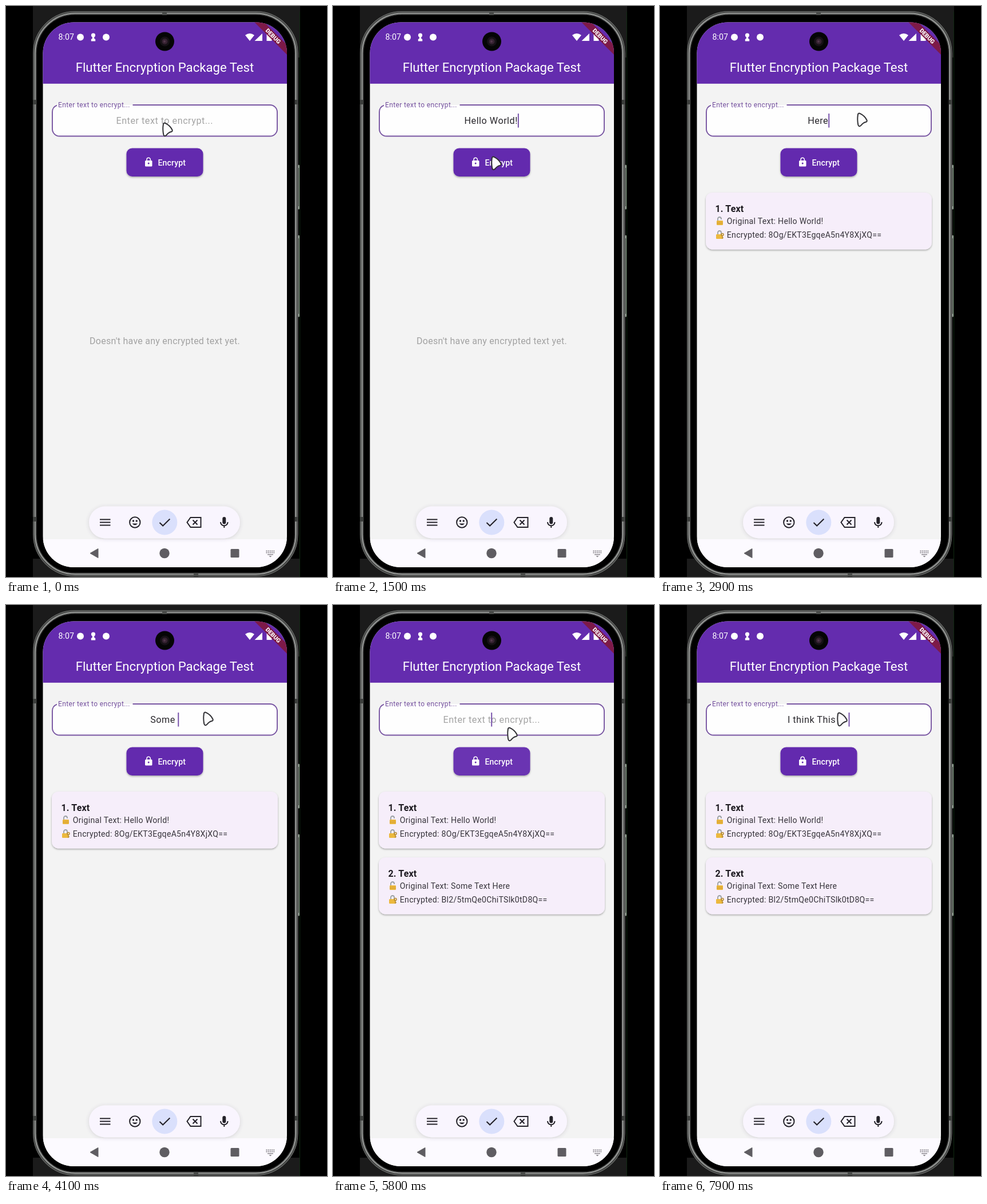
Write an HTML page that moves like this. It is 561 px wide and 998 px high and loops after 8 s.

```html
<!DOCTYPE html>
<html lang="en">
<head>
<meta charset="utf-8">
<title>Encryption demo</title>
<style>
  html, body { margin: 0; width: 100%; height: 100%; overflow: hidden; background: #000; }
  svg { display: block; width: 561px; height: 998px; }
  text { font-family: Roboto, "Open Sans", sans-serif; white-space: pre; }
  .field { font-size: 16.2px; letter-spacing: .5px; }
  .body { font-size: 14.100px; letter-spacing: .28px; fill: #37343b; }
  .line { fill: none; stroke: #242229; stroke-width: 2; }
</style>
</head>
<body>
<svg viewBox="0 0 561 998">
  <defs>
    <clipPath id="screen"><rect x="64.5" y="28.5" width="426.5" height="952.5" rx="54"/></clipPath>
    <filter id="shade" x="-10%" y="-25%" width="120%" height="160%">
      <feDropShadow dx="0" dy="1.6" stdDeviation="1.5" flood-opacity=".32"/>
    </filter>
    <filter id="soft" x="-10%" y="-30%" width="120%" height="160%">
      <feDropShadow dx="0" dy="1" stdDeviation="3" flood-color="#504060" flood-opacity=".2"/>
    </filter>
    <symbol id="open" overflow="visible">
      <path d="M4 7V4a3 3 0 0 1 6 0v1" fill="none" stroke="#9aa0a3" stroke-width="1.8"/>
      <rect x="2" y="7" width="11" height="8" rx="1.2" fill="#ecb93e"/>
      <path d="M2 10h11M2 12.5h11" stroke="#d0982c" stroke-width=".8"/>
    </symbol>
    <symbol id="keyed" overflow="visible">
      <path d="M4 7V4a3 3 0 0 1 6 0v3" fill="none" stroke="#9aa0a3" stroke-width="1.8"/>
      <rect x="1" y="7" width="11" height="8" rx="1.2" fill="#ecb93e"/>
      <circle cx="12" cy="7.500" r="2" fill="none" stroke="#b58a2c" stroke-width="1.500"/>
      <path d="M12 9.500v5.500m0-2h1.800" stroke="#b58a2c" stroke-width="1.400"/>
    </symbol>
  </defs>

  <!-- phone body -->
  <path d="M47 0H514V90H47zM47 966H514V998H47z" fill="#1b1b1b"/>
  <path d="M513.5 10V998" stroke="#102a12"/>
  <path d="M511.5 279V354M511.5 402V542" stroke="#8c958c" stroke-width="3" stroke-linecap="round"/>
  <path d="M511.5 283V350M511.5 406V538" stroke="#303630" stroke-width="1"/>
  <rect x="47.800" y="9.800" width="462" height="986.500" rx="73" fill="#2c2d2c" stroke="#686a68" stroke-width="1.500"/>
  <rect x="51" y="13" width="455.500" height="980" rx="70" fill="#000" stroke="#8c8e8c" stroke-width="3"/>
  <rect x="53.500" y="15.500" width="450.500" height="975" rx="67" fill="#000" stroke="#262626"/>
  <path d="M47 168h6M47 897h6M505 168h5M505 897h5" stroke="#3c3e3c" stroke-width="8"/>
  <path d="M277 10v6M332 991v6" stroke="#4a4c4a" stroke-width="8"/>

  <g clip-path="url(#screen)">
    <rect x="64" y="28" width="428" height="954" fill="#f3f3f3"/>
    <rect x="64" y="28" width="428" height="107.800" fill="#642cae"/>

    <!-- status bar -->
    <g fill="#fff">
      <text x="91.500" y="59" font-size="14.200">8:07</text>
      <circle cx="130" cy="54.500" r="6"/>
      <circle cx="152.500" cy="51" r="3.600"/>
      <path d="M150.800 52h3.400v5l2 1v3.500h-7.400V58l2-1z"/>
      <circle cx="175" cy="54.500" r="6"/>
      <path d="M418 51q8-6 16 0l-8 10zM434.500 61l13.500-13v13z"/>
      <path d="M455.500 49h2.500v-2h4v2h2.500v12h-9z"/>
    </g>
    <g transform="translate(491 28.500) rotate(45)">
      <rect x="-60" y="28" width="120" height="12" fill="#7f1942" fill-opacity=".94"/>
      <text y="37.600" font-size="10.200" font-weight="900" fill="#fff" text-anchor="middle">DEBUG</text>
    </g>
    <circle cx="277.500" cy="62" r="16.500" fill="#050505"/>
    <circle cx="277.500" cy="62" r="8.500" fill="#161116"/>
    <circle cx="277.500" cy="62" r="5" fill="#352231"/>
    <circle cx="277" cy="62" r="2" fill="#51374b"/>
    <text x="277.500" y="115.200" font-size="22.150" fill="#fff" text-anchor="middle">Flutter Encryption Package Test</text>

    <!-- input -->
    <rect x="81" y="173" width="393" height="54.500" rx="12.500" fill="#fefefe"/>
    <path d="M221.500 173H461.500a12.500 12.500 0 0 1 12.500 12.500V215a12.500 12.500 0 0 1-12.500 12.500H93.500A12.500 12.500 0 0 1 81 215V185.500Q81 176.500 89 173.700" fill="none" stroke="#7855a2" stroke-width="1.900"/>
    <text x="91" y="177" font-size="12" letter-spacing=".375" fill="#75519f">Enter text to encrypt...</text>
    <text id="hint" class="field" x="277.300" y="205.500" fill="#a4a4a4" text-anchor="middle">Enter text to encrypt...</text>
    <text id="typed" class="field" y="205.500" fill="#2a282d"></text>
    <rect id="caret" y="188" width="2" height="24.500" fill="#7954ac"/>

    <!-- button -->
    <rect x="210.500" y="248.500" width="134" height="49.500" rx="10" fill="#642cae" filter="url(#shade)"/>
    <rect id="press" x="210.500" y="248.500" width="134" height="49.500" rx="10" fill="#fff"/>
    <g fill="#fff">
      <path d="M243 271.500q0-1.500 1.500-1.500h9.500q1.500 0 1.500 1.500v7.500q0 1.500-1.500 1.500h-9.500q-1.500 0-1.500-1.500z"/>
      <path d="M246 270.500v-2a3.200 3.200 0 0 1 6.400 0v2" fill="none" stroke="#fff" stroke-width="1.500"/>
      <circle cx="249.200" cy="275" r="1.500" fill="#642cae"/>
      <text x="265.500" y="278.500" font-size="14.100" font-weight="500" letter-spacing=".1">Encrypt</text>
    </g>

    <text id="empty" x="277.500" y="591" font-size="16" letter-spacing=".25" fill="#a2a2a2" text-anchor="middle">Doesn't have any encrypted text yet.</text>
    <g id="cards"></g>

    <!-- keyboard strip and navigation -->
    <rect x="64" y="932" width="428" height="50" fill="#fcfaff"/>
    <rect x="145" y="874.500" width="264" height="56" rx="28" fill="#f9f5fe" filter="url(#soft)"/>
    <circle cx="277.300" cy="902.500" r="22" fill="#dae0fc"/>
    <g class="line">
      <path d="M164 897.500h18.500M164 902.500h18.500M164 907.500h18.500"/>
      <circle cx="225.300" cy="902.500" r="9.200"/>
      <path d="M220.500 904.500q4.800 5.500 9.600 0z" fill="#242229" stroke="none"/>
      <path d="M221 900h3M226.700 900h3" stroke-width="2.800"/>
      <path d="M268.500 903l5.700 5.500 12.200-12"/>
      <path d="M322.500 894h18v17h-18l-6-8.500zM326.500 898.500l8 8m0-8l-8 8"/>
      <path d="M375 902a6.300 6.300 0 0 0 12.600 0M381.300 908v4"/>
      <rect x="378.300" y="893" width="6" height="12.500" rx="3" fill="#242229" stroke="none"/>
    </g>
    <g fill="#5f5d62">
      <path d="M147 956.500l14-8v16z" stroke="#5f5d62" stroke-linejoin="round"/>
      <circle cx="277" cy="956.500" r="8.700"/>
      <rect x="392.500" y="949" width="15" height="15" rx="1.500"/>
    </g>
    <path d="M454.500 952.500h15M454.500 955.500h15" stroke="#8b888e" stroke-width="1.800" stroke-dasharray="1.900 1.300"/>
    <path d="M457 958.700h10" stroke="#8b888e" stroke-width="1.500"/>
    <path d="M459.500 961h5l-2.500 2.500z" fill="#8b888e"/>
  </g>

  <path id="mouse" d="M.8 2.500Q1-1 4-.3Q13 4 16.500 11.500Q17.500 14.500 14 15Q10 16 6 21Q2.500 24 1.200 19.500Q-.5 10 .8 2.500z" fill="#fcfcfc" stroke="#303034" stroke-width="2" stroke-linejoin="round"/>
</svg>
<script>
const LOOP = 8000, MID = 276.2;
const FIRST = 1780, SECOND = 5500;
const $ = id => document.getElementById(id);
const [hint, typed, caret, press, empty, mouse] =
  ['hint', 'typed', 'caret', 'press', 'empty', 'mouse'].map($);

// Each edit runs from one text to another, one key at a time.
const edits = [
  { at: 150, step: 120, text: 'Hello World!' },
  { at: FIRST, step: 1, text: '' },
  { at: 2450, step: 120, text: 'Here' },
  { at: 3050, step: 100, text: 'Here', erase: true },
  { at: 3550, step: 120, text: 'Some Text Here' },
  { at: SECOND, step: 1, text: '' },
  { at: 6050, step: 115, text: 'I think This is ' }
];

// Rows are time, x, y.
const route = [
  [0, 274, 205], [1300, 274, 205], [1600, 278, 284], [2000, 278, 284],
  [2380, 345, 188], [5080, 345, 188], [5350, 301, 278], [5620, 301, 278],
  [5800, 305, 215], [5950, 310, 189], [LOOP, 310, 189]
];

// Rows are time, overlay opacity.
const glow = [
  [0, 0], [1600, 0], [1700, .14], [1850, .14], [2050, 0],
  [5370, 0], [5460, .14], [5650, .14], [5900, 0], [LOOP, 0]
];

function card(y, n, plain, secret) {
  return `<g transform="translate(80 ${y})" visibility="hidden">
    <rect width="395" height="99.500" rx="12" fill="#f6eefa" filter="url(#shade)"/>
    <text x="16.500" y="33.500" font-size="16" font-weight="700" letter-spacing=".15" fill="#1d1a20">${n}. Text</text>
    <use href="#open" x="17" y="42"/><use href="#keyed" x="17" y="66"/>
    <text class="body" x="36.800" y="55">Original Text: ${plain}</text>
    <text class="body" x="36.800" y="78.500">Encrypted: ${secret}</text></g>`;
}
$('cards').innerHTML =
  card(326, 1, 'Hello World!', '8Og/EKT3EgqeA5n4Y8XjXQ==') +
  card(441, 2, 'Some Text Here', 'Bl2/5tmQe0ChiTSlk0tD8Q==');
const cards = $('cards').children;

function sample(rows, t) {
  const i = rows.findIndex(r => r[0] > t), a = rows[i - 1], b = rows[i];
  const p = (t - a[0]) / (b[0] - a[0]), k = p * p * (3 - 2 * p);
  return a.slice(1).map((v, j) => v + (b[j + 1] - v) * k);
}

function input(t) {
  const e = edits.filter(x => x.at <= t).pop();
  if (!e) return { text: '', last: -500 };
  const size = e.text.length;
  const keys = Math.min(size, Math.floor((t - e.at) / e.step) + 1);
  return {
    text: e.text.slice(0, e.erase ? size - keys : keys),
    last: e.at + Math.max(0, keys - 1) * e.step
  };
}

const show = (el, on) => el.setAttribute('visibility', on ? 'visible' : 'hidden');

function draw(t) {
  const { text, last } = input(t);
  typed.textContent = text;
  const width = text ? typed.getComputedTextLength() : 0;
  typed.setAttribute('x', MID - width / 2);
  caret.setAttribute('x', MID + width / 2);
  show(caret, (t - last) % 1000 < 500);
  const fade = last < 0 ? 1 : Math.min(1, Math.max(0, (t - last - 30) / 150));
  hint.setAttribute('opacity', text ? 0 : fade);
  show(empty, t < FIRST);
  show(cards[0], t >= FIRST);
  show(cards[1], t >= SECOND);
  press.setAttribute('opacity', sample(glow, t)[0]);
  mouse.setAttribute('transform', `translate(${sample(route, t)})`);
}

const start = performance.now();
function tick() {
  draw((performance.now() - start) % LOOP);
  requestAnimationFrame(tick);
}
tick();
</script>
</body>
</html>
```
